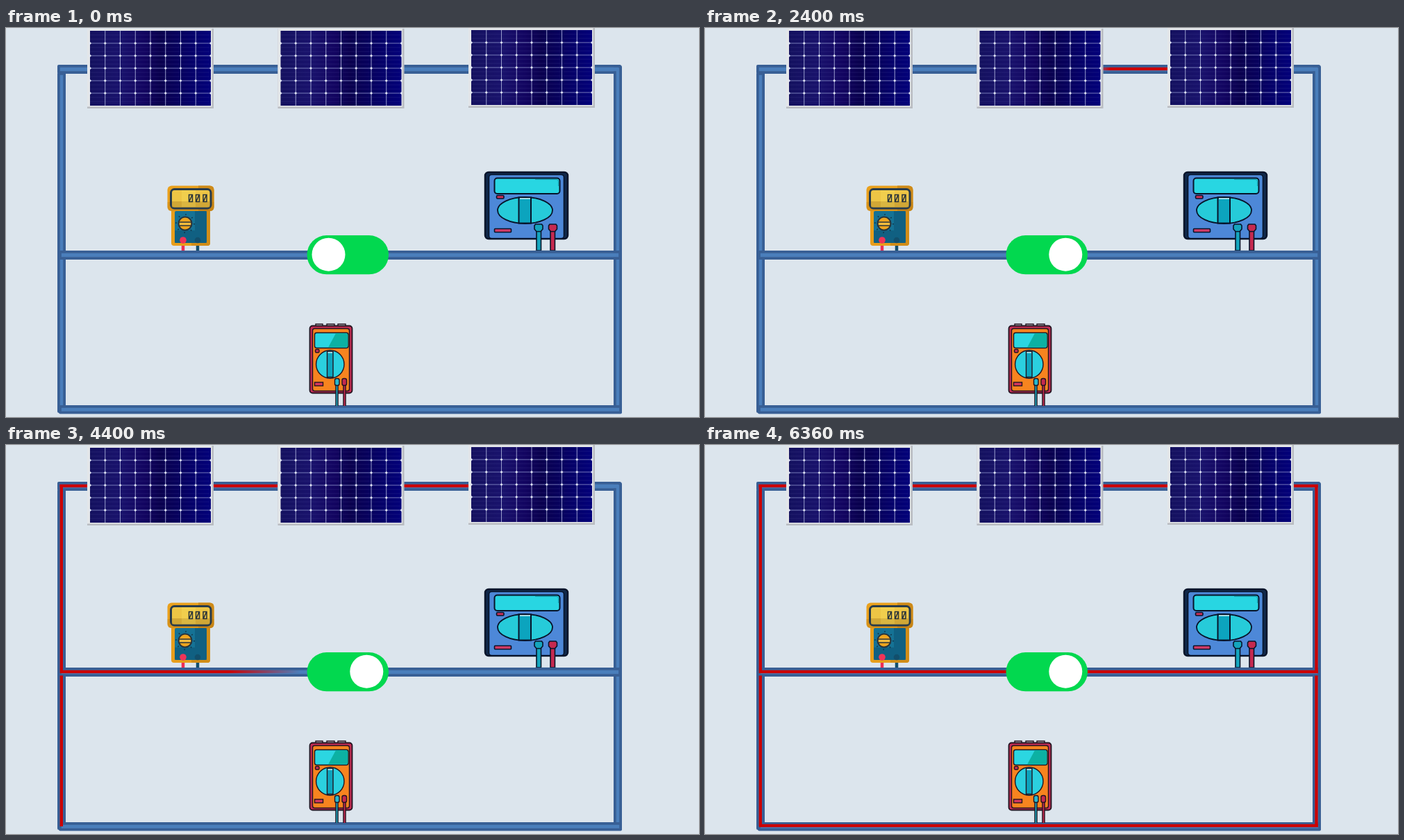
An HTML page for the animation above (6.4 s loop, 998 by 561 pixels).

```html
<!DOCTYPE html>
<html lang="en">
<head>
<meta charset="utf-8">
<title>Solar circuit</title>
<style>
  html, body { margin: 0; width: 100%; height: 100%; overflow: hidden; background: #dce5ed; }
  svg { display: block; width: 100vw; height: 100vh; }
</style>
</head>
<body>
<svg id="stage" viewBox="0 0 998 561" preserveAspectRatio="none">
  <defs>
    <linearGradient id="cells">
      <stop offset="0" stop-color="#14115f"/>
      <stop offset=".25" stop-color="#19126c"/>
      <stop offset=".45" stop-color="#120460"/>
      <stop offset=".58" stop-color="#09004e"/>
      <stop offset=".75" stop-color="#06005f"/>
      <stop offset="1" stop-color="#02007a"/>
    </linearGradient>
    <g id="panel"></g>
  </defs>
  <rect width="998" height="561" fill="#dce5ed"/>
  <g id="bars"></g>
  <g id="current"></g>
  <use href="#panel" x="117" y="1"/>
  <use href="#panel" x="391.5" y="1"/>
  <use href="#panel" x="666" y="0"/>

  <g id="yellow-meter">
    <path d="M255 306V321" stroke="#ee2f55" stroke-width="4.5"/>
    <path d="M276 306V321" stroke="#124f6c" stroke-width="4.5"/>
    <rect x="238" y="258" width="56" height="56" rx="4" fill="#e79e1b"/>
    <path d="M267 258H294V310q0 4-4 4H267Z" fill="#d18d18"/>
    <rect x="243" y="264" width="46" height="46" rx="2" fill="#157295"/>
    <path d="M243 292H289V310H243ZM272 264H289V310H272Z" fill="#0d5373" opacity=".55"/>
    <rect x="232.5" y="227.500" width="67" height="36.500" rx="6" fill="#e9a01c"/>
    <path d="M277 227.500H293.500q6 0 6 6V258q0 6-6 6H277Z" fill="#cd8a19"/>
    <path d="M232.500 251H299.500V258q0 6-6 6H238.500q-6 0-6-6Z" fill="#b87912" opacity=".35"/>
    <rect x="237.500" y="232.500" width="57.500" height="27.500" rx="5" fill="#edc545" stroke="#283b4b" stroke-width="3"/>
    <path d="M239 250H293.500V258.500H239Z" fill="#c0942e" opacity=".6"/>
    <path d="M253 234H273V258H253Z" fill="#fff06e" opacity=".2"/>
    <g fill="none" stroke="#26313a" stroke-width="1.5">
      <path id="digit" d="M263.500 240.500H268.500V250.500H263.500ZM264 250L268 241"/>
      <use href="#digit" x="10"/><use href="#digit" x="20.500"/>
    </g>
    <circle cx="258" cy="282" r="13" fill="none" stroke="#13364a" stroke-width="2" stroke-dasharray="1.500 8.700"/>
    <circle cx="258" cy="282" r="9.500" fill="#eda41f" stroke="#28333b" stroke-width="2"/>
    <path d="M249 280H267V285H249Z" fill="#f4bd3e" stroke="#28333b" stroke-width="1.500"/>
    <circle cx="255" cy="306" r="4.800" fill="#f03458"/>
    <circle cx="276" cy="306" r="4.300" fill="#124f6c"/>
  </g>

  <g id="blue-meter" stroke="#07142a" stroke-width="1.600">
    <rect x="690" y="208" width="119" height="96" rx="5" fill="#10284a" stroke-width="2.500"/>
    <rect x="695.500" y="211.500" width="108" height="92" rx="4" fill="#4d88d8"/>
    <rect x="703.500" y="216.500" width="94" height="22.500" rx="4" fill="#28d6e2" stroke-width="2"/>
    <path d="M762 218.500H793q2.500 0 2.500 3V228" fill="none" stroke="#159bae" stroke-width="1"/>
    <rect x="706.500" y="241.500" width="10.500" height="4.500" rx="1.500" fill="#cb3158"/>
    <ellipse cx="747.500" cy="263" rx="39.500" ry="19" fill="#26cbd9" stroke-width="1.800"/>
    <rect x="738.500" y="244.500" width="17.500" height="37" fill="#0ca4be" stroke-width="2"/>
    <path d="M740 246H755" stroke="#dcf8fa" stroke-width="1.500"/>
    <rect x="703.500" y="289.500" width="24" height="5" rx="1" fill="#d23c68"/>
    <g fill="#14a5bd">
      <rect x="764" y="291" width="6.500" height="30"/>
      <path d="M762.500 283H771.500L773 285V290L770 293.500H764L761 290V285Z"/>
    </g>
    <g fill="#c5294f">
      <rect x="784" y="291" width="6.500" height="30"/>
      <path d="M783 283H792L793.500 285V290L790.500 293.500H784.500L781.500 290V285Z"/>
    </g>
    <path d="M762 321.600H793" stroke="#385f92" stroke-width="1.500"/>
  </g>

  <g id="orange-meter" stroke="#221421" stroke-width="1.400">
    <path d="M446 430V427H456V430M462 430V427H473V430M478 430V427H489V430" fill="#eef1f3"/>
    <rect x="437.500" y="429.500" width="61" height="97" rx="4" fill="#c22c52" stroke-width="1.800"/>
    <rect x="441.500" y="433.500" width="53" height="90" rx="3" fill="#f7841f"/>
    <rect x="444.500" y="439.500" width="48.500" height="22" rx="3" fill="#2bd6e1"/>
    <path d="M475 440.300H490q2.300 0 2.300 2.500V458q0 2.700-2.300 2.700H464Z" fill="#0cb1a3" stroke="none"/>
    <rect x="445.500" y="463.500" width="5.500" height="4.500" rx="1.500" fill="#cb3158"/>
    <circle cx="466.800" cy="485" r="20.200" fill="#2bd0df"/>
    <path d="M462.500 466.500H471V503.500H462.500Z" fill="#0ca4be"/>
    <path d="M463.500 468H470" stroke="#def8fa"/>
    <rect x="444.500" y="511" width="12" height="5" fill="#d7375f"/>
    <path d="M476.500 514V545M487.500 514V545" stroke-width="4.500"/>
    <path d="M476.500 514V545" stroke="#18a8bf" stroke-width="1.800"/>
    <path d="M487.500 514V545" stroke="#c5294f" stroke-width="1.800"/>
    <rect x="473.500" y="505.500" width="6.500" height="10" rx="2.500" fill="#28b9cd"/>
    <rect x="484" y="505.500" width="6.500" height="10" rx="2.500" fill="#c5294f"/>
  </g>

  <rect x="433.500" y="299" width="117.500" height="56.300" rx="28.100" fill="#02d84f"/>
  <circle id="knob" cx="464.500" cy="326.700" r="24" fill="#fff"/>
</svg>
<script>
const LOOP = 6400;
const BEAT = 489;
const SLIDE = 4 * BEAT;
const SOFT = 0.25;
const RED = "#cb0205";
const RED_WIDTH = 4.4;

const el = (parent, tag, attrs) => {
  const node = document.createElementNS("http://www.w3.org/2000/svg", tag);
  for (const key in attrs) node.setAttribute(key, attrs[key]);
  return parent.appendChild(node);
};
const byId = id => document.getElementById(id);
const box = (parent, x, y, width, height, fill, rx = 0) =>
  el(parent, "rect", { x, y, width, height, fill, rx });

function buildPanel() {
  const g = byId("panel"), left = 4, top = 3, cw = 21.75, ch = 18;
  box(g, 0, 0, 182, 115, "#b9bcc1");
  box(g, 0, 0, 179.5, 112.5, "#e3e6e9");
  box(g, left, top, 8 * cw, 6 * ch, "url(#cells)");
  let columns = "", rows = "", bus = "", dots = "";
  for (let c = 1; c < 8; c++) columns += `M${left + c * cw} ${top}v${6 * ch}`;
  for (let r = 0; r < 6; r++) {
    const y = top + r * ch;
    bus += `M${left} ${y + 6}h174M${left} ${y + 12}h174`;
    if (!r) continue;
    rows += `M${left} ${y}h174`;
    for (let c = 0; c <= 8; c++) dots += `M${left + c * cw} ${y - 2}l2 2l-2 2l-2 -2z`;
  }
  el(g, "path", { d: bus, stroke: "#6567ae", "stroke-width": 0.6, opacity: 0.3 });
  el(g, "path", { d: rows, stroke: "#8288c2", "stroke-width": 0.9 });
  el(g, "path", { d: columns, stroke: "#a6add7", "stroke-width": 0.9 });
  el(g, "path", { d: dots, fill: "#e0e4f4" });
}

function bar(x, y, w, h) {
  const g = byId("bars"), rim = 3.8;
  box(g, x, y, w, h, "#385f95", 2);
  box(g, x + rim, y + rim, w - 2 * rim, h - 2 * rim, "#4a7ebb");
}

// A red run is revealed from a to b along one axis, with a soft leading edge.
const runs = [];
function run(axis, line, a, b, beat, beats = 1) {
  const parent = byId("current"), id = "run" + runs.length;
  const grad = el(parent, "linearGradient", { id, gradientUnits: "userSpaceOnUse", x1: 0, x2: 0, y1: 0, y2: 0 });
  el(grad, "stop", { offset: 0, "stop-color": RED });
  el(grad, "stop", { offset: 1, "stop-color": RED, "stop-opacity": 0 });
  const from = Math.min(a, b), length = Math.abs(b - a), side = line - RED_WIDTH / 2;
  const rect = axis === "x"
    ? box(parent, from, side, length, RED_WIDTH, `url(#${id})`)
    : box(parent, side, from, RED_WIDTH, length, `url(#${id})`);
  runs.push({ axis, a, b, grad, rect, start: SLIDE + beat * BEAT, time: beats * BEAT });
}

function drawRun({ axis, a, b, grad, rect, start, time }, t) {
  const u = Math.min(1, (t - start) / time);
  rect.setAttribute("visibility", u > 0 ? "visible" : "hidden");
  if (u <= 0) return;
  const lead = u * (1 + SOFT);
  grad.setAttribute(axis + 1, a + (b - a) * (lead - SOFT));
  grad.setAttribute(axis + 2, a + (b - a) * lead);
}

function easeInOut(u) {
  const power = 2.3;
  return u < 0.5 ? (2 * u) ** power / 2 : 1 - (2 - 2 * u) ** power / 2;
}

buildPanel();
bar(74, 53, 812, 13);
bar(74, 64, 12, 491);
bar(875, 54, 12, 500);
box(byId("bars"), 848, 56.8, 34.5, 5.4, "#4a7ebb");
bar(76, 321, 810, 13);
bar(76, 544, 811, 12.5);

run("x", 59, 666, 573, 0);
run("x", 59, 391, 299, 1);
run("x", 59, 117, 77.5, 2);
run("y", 79.8, 57, 329, 3);
run("y", 79.8, 332.5, 550, 4);
run("x", 327, 78, 493, 4, 1.5);
run("x", 549, 78, 883, 5);
run("x", 327, 493, 883, 5.5, 1.5);
run("y", 880.5, 551, 332.5, 6);
run("y", 880.5, 327, 57, 7);
run("x", 59, 883, 847, 8);

function render(t) {
  const slide = easeInOut(Math.min(1, t / SLIDE));
  byId("knob").setAttribute("cx", 464.5 + 54.8 * slide);
  runs.forEach(r => drawRun(r, t));
}

const origin = performance.now();
function tick() {
  render((performance.now() - origin) % LOOP);
  requestAnimationFrame(tick);
}
tick();
</script>
</body>
</html>
```
